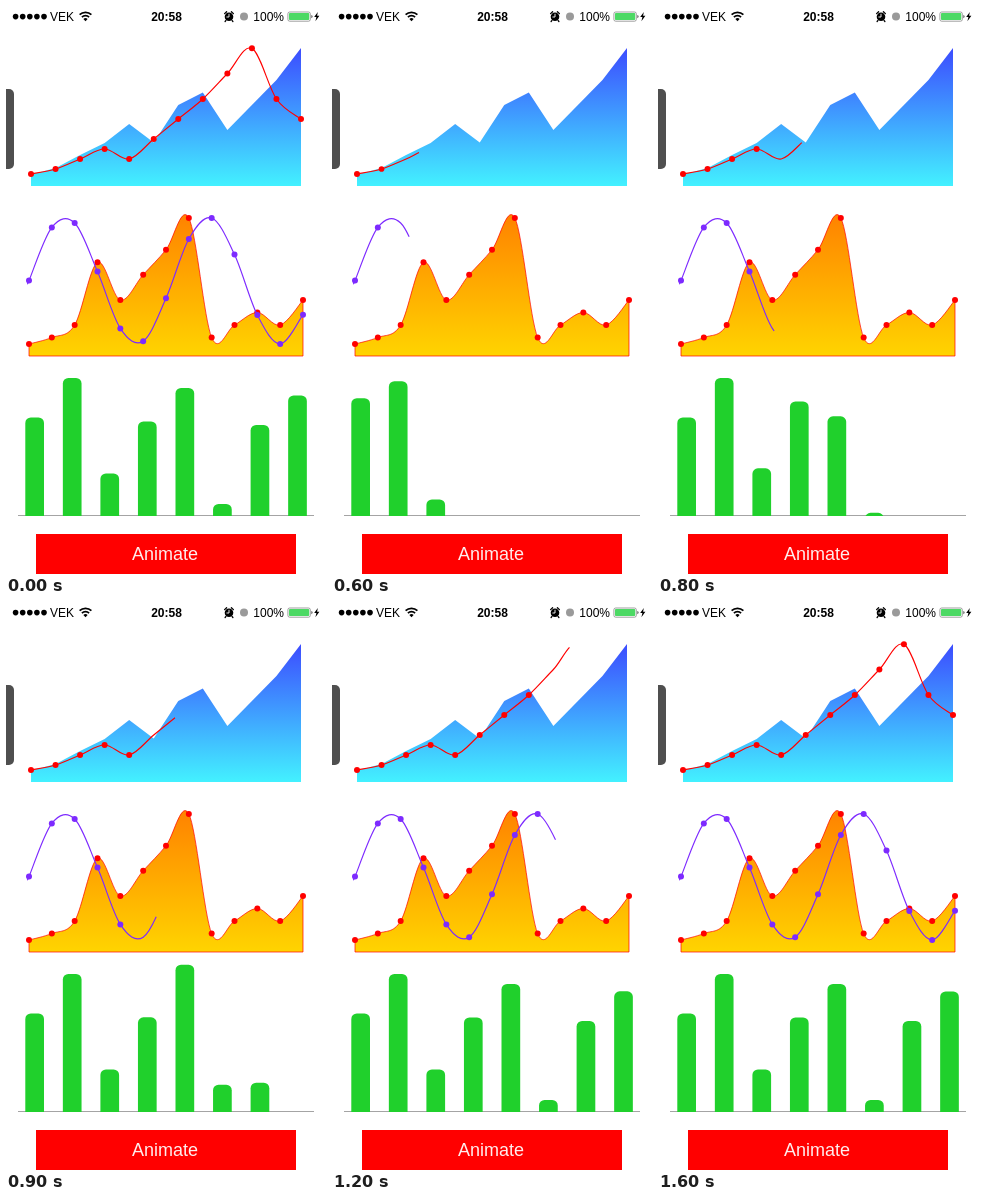
Write an HTML page that moves like this. It is 320 px wide and 568 px high and loops after 2700 ms.

```html
<!DOCTYPE html>
<html lang="en">
<head>
<meta charset="utf-8">
<title>Animated charts</title>
<style>
  html, body { margin: 0; width: 100%; height: 100%; overflow: hidden; background: #fff; }
  svg { display: block; width: 100%; height: 100%; }
  text { font-family: "Liberation Sans", Arial, sans-serif; font-size: 12px; }
</style>
</head>
<body>
<svg id="stage" viewBox="0 0 320 568">
  <defs>
    <linearGradient id="blue" gradientUnits="userSpaceOnUse" x1="0" y1="42" x2="0" y2="180">
      <stop offset="0" stop-color="#3c4cff"/><stop offset="1" stop-color="#43f1ff"/>
    </linearGradient>
    <linearGradient id="orange" gradientUnits="userSpaceOnUse" x1="0" y1="208" x2="0" y2="350">
      <stop offset="0" stop-color="#ff8200"/><stop offset="1" stop-color="#ffd400"/>
    </linearGradient>
    <clipPath id="floor"><path d="M0 360H320V510H0Z"/></clipPath>
  </defs>
  <rect width="320" height="568" fill="#fff"/>

  <g id="signal"></g>
  <text x="44" y="15">VEK</text>
  <g fill="none" stroke="#000" stroke-width="1.7">
    <path d="M73.6 8.7a8.4 8.4 0 0 1 11.8 0M75.9 11.1a5.1 5.1 0 0 1 7.2 0"/>
    <path d="M79.5 15.2l-2.1-2.2a3 3 0 0 1 4.2 0Z" fill="#000" stroke="none"/>
  </g>
  <text x="160.5" y="15" text-anchor="middle" font-weight="bold">20:58</text>
  <g fill="none" stroke="#000" stroke-linecap="round">
    <circle cx="223" cy="10.8" r="4.3" fill="#000" stroke="none"/>
    <path d="M218.6 7.6l2-1.9M227.4 7.6l-2-1.9M220 14.4l-.9 1.1M226 14.4l.9 1.1" stroke-width="1.3"/>
    <path d="M223 8.2v2.8h-2.2" stroke="#fff" stroke-width=".9"/>
  </g>
  <circle cx="238" cy="10.5" r="4" fill="#9a9a9a"/>
  <text x="247.3" y="15">100%</text>
  <rect x="281.9" y="6" width="22.4" height="9.2" rx="1.8" fill="#fff" stroke="#777" stroke-width=".7"/>
  <rect x="283" y="7.1" width="20.2" height="7" rx=".8" fill="#4cd964"/>
  <path d="M305.2 9q1.5.3 1.5 1.6t-1.5 1.6Z" fill="#777"/>
  <path d="M311.8 6l-3.6 5h2.2l-1 4.2 4-5.4h-2.3Z"/>

  <path d="M0 83H3a5 5 0 0 1 5 5V158a5 5 0 0 1-5 5H0Z" fill="#4f4f4f"/>
  <g id="charts"></g>
  <path d="M12 509.5H308" stroke="#a4a4a4"/>
  <g id="bars" fill="#20d02c" clip-path="url(#floor)"></g>

  <rect x="30" y="528" width="260" height="40" fill="#f00"/>
  <text x="159" y="554" text-anchor="middle" style="font-size:18px" fill="#fff" fill-opacity=".93">Animate</text>
</svg>
<script>
const LOOP = 2700, TICK = 100, START = 400;
const RED = '#f00', VIOLET = '#7d2aff', BASE = 510;

const $ = id => document.getElementById(id);
const clamp = v => Math.max(0, Math.min(1, v));
const smooth = v => { v = clamp(v); return v * v * (3 - 2 * v); };

function add(parent, tag, attrs) {
  const el = document.createElementNS('http://www.w3.org/2000/svg', tag);
  for (const key in attrs) el.setAttribute(key, attrs[key]);
  return parent.appendChild(el);
}

const spread = (ys, left, right) =>
  ys.map((y, i) => [left + (right - left) * i / (ys.length - 1), y]);

// Catmull-Rom spline as cubic segments, without the initial move.
function spline(pts) {
  const at = i => pts[Math.max(0, Math.min(pts.length - 1, i))];
  let d = '';
  for (let i = 0; i < pts.length - 1; i++) {
    const [a, b, c, e] = [at(i - 1), at(i), at(i + 1), at(i + 2)];
    const c1 = b.map((v, k) => v + (c[k] - a[k]) / 6);
    const c2 = c.map((v, k) => v - (e[k] - b[k]) / 6);
    d += `C${c1} ${c2} ${c}`;
  }
  return d;
}

const charts = $('charts');
const addDots = (pts, fill) =>
  pts.map(([cx, cy]) => add(charts, 'circle', { cx, cy, r: 3, fill }));

function addLine(pts, stub, stroke) {
  const d = `M${stub}L${pts[0]}${spline(pts)}`;
  const path = add(charts, 'path', { d, fill: 'none', stroke, 'stroke-width': 1.15 });
  return { path, length: path.getTotalLength(), dots: addDots(pts, stroke) };
}

for (let i = 0; i < 5; i++) add($('signal'), 'circle', { cx: 9.6 + 7.1 * i, cy: 10.6, r: 2.8 });

const hills = spread([168.5, 162, 149, 137, 118, 136.5, 99, 86.5, 124, 99, 74, 42], 25, 295);
add(charts, 'path', { d: `M25 180L${hills.join('L')}V180Z`, fill: 'url(#blue)' });
const redLine = addLine(
  spread([168, 163, 153, 143, 153, 133, 113, 93, 67.5, 42.3, 93, 113], 25, 295), [23, 168.4], RED);

const wave = spread([338, 331.5, 319, 256.3, 294, 268.7, 243.7, 212, 331.5, 319, 306.5, 319, 294], 23, 297);
add(charts, 'path', {
  d: `M23 350L${wave[0]}${spline(wave)}V350Z`, fill: 'url(#orange)', stroke: RED, 'stroke-width': .7
});
addDots(wave, RED);
const violetLine = addLine(
  spread([274.6, 221.4, 217, 265.6, 322.4, 335.2, 292.3, 233, 212, 248.5, 309, 338, 308.7], 23, 297),
  [21.4, 278.3], VIOLET);

const bars = [98.5, 138, 42.5, 94.5, 128, 12, 91, 120.5].map((height, i) => ({
  height, el: add($('bars'), 'rect', { x: 19.3 + 37.55 * i, width: 18.7, rx: 5.5 })
}));

function drawLine({ path, length, dots }, t) {
  const shown = clamp((t + 7) / 1107) * length;
  path.setAttribute('stroke-dasharray', `${shown} ${length + 9}`);
  dots.forEach((dot, i) => {
    dot.setAttribute('r', 3 * clamp((t - 70 - i * 1107 / dots.length) / 40));
  });
}

// Each bar rises 20 px too far, then settles.
function drawBar({ el, height }, i, t) {
  const local = t + 10 - 75 * i;
  const h = (height + 20) * smooth(local / 178) - 20 * smooth((local - 200) / 90);
  el.setAttribute('y', BASE - h);
  el.setAttribute('height', h + 20);
}

function draw(time) {
  const now = Math.floor(time % LOOP / TICK) * TICK;
  const t = now < START ? LOOP : now - START;
  drawLine(redLine, t);
  drawLine(violetLine, t);
  bars.forEach((bar, i) => drawBar(bar, i, t));
}

const origin = performance.now();
function loop() {
  draw(performance.now() - origin);
  requestAnimationFrame(loop);
}
loop();
</script>
</body>
</html>
```
